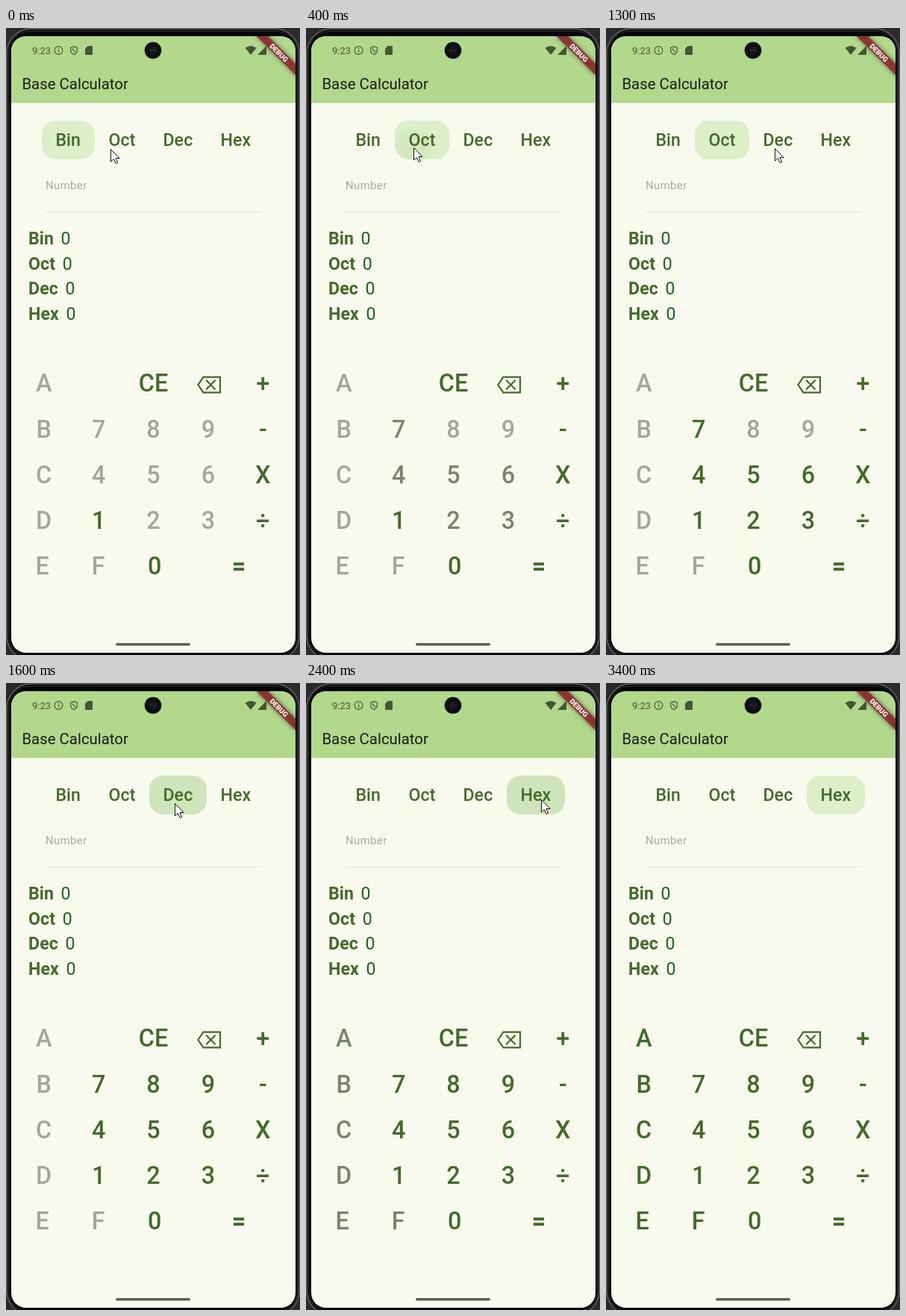
These frames come from a looping animation (394 px wide and 840 px high, 3500 ms). An HTML page:

```html
<!DOCTYPE html>
<html lang="en">
<head>
<meta charset="utf-8">
<title>Base Calculator</title>
<style>
  html, body { margin: 0; width: 100%; height: 100%; overflow: hidden; background: #111; }
  svg { display: block; width: 394px; height: 840px; font-family: Roboto, "Noto Sans", sans-serif; }
  .tab { font-size: 23.15px; font-weight: 500; fill: #446a2b; letter-spacing: .1px; }
  .base { font-size: 23.15px; font-weight: 700; fill: #446a2b; }
  .value { font-size: 23.15px; fill: #1f6124; }
  .key { font-size: 32.4px; font-weight: 500; text-anchor: middle; }
  .heavy { font-weight: 700; }
</style>
</head>
<body>
<svg viewBox="0 0 394 840">
  <defs>
    <clipPath id="screen"><rect x="7" y="11" width="381" height="826" rx="20"/></clipPath>
    <clipPath id="pillClip"><rect id="inkArea" y="124" height="52" rx="18.5"/></clipPath>
    <filter id="blur" x="-20%" y="-80%" width="140%" height="260%"><feGaussianBlur stdDeviation="3.4"/></filter>
    <radialGradient id="ink"><stop offset=".5" stop-color="#33691e"/><stop offset="1" stop-color="#33691e" stop-opacity="0"/></radialGradient>
  </defs>

  <!-- phone body -->
  <rect width="394" height="840" fill="#2a2a2b"/>
  <rect x="1" y="1" width="392" height="846" rx="33" fill="#0e0e0f" stroke="#656567" stroke-width="1.4"/>
  <rect x="3.5" y="4.5" width="387" height="838" rx="28" fill="#050505" stroke="#2e2e30"/>

  <g clip-path="url(#screen)">
    <rect x="7" y="11" width="381" height="826" fill="#f9faee"/>
    <rect x="7" y="11" width="381" height="89.5" fill="#b1d88b"/>

    <!-- status bar -->
    <g fill="#465638">
      <text x="35" y="34.5" font-size="13">9:23</text>
      <circle cx="70.5" cy="30" r="5.4" fill="none" stroke="#465638" stroke-width="1.2"/>
      <path d="M69.9 29.2h1.3v3.6h-1.3zM69.9 26.9h1.3v1.3h-1.3z"/>
      <path d="M91 24.6l4.4 1.7v3.4c0 2.8-1.8 4.9-4.4 5.9c-2.6-1-4.4-3.1-4.4-5.9v-3.4zM88.7 27.5l4.5 5.2" fill="none" stroke="#465638" stroke-width="1.2"/>
      <path d="M109.7 24h5.3q1 0 1 1v10q0 1-1 1h-8q-1 0-1-1v-7.3z"/>
      <path d="M328 36l-7.5-9.3q7.5-5.4 15 0zM349 24v12h-12z"/>
    </g>
    <circle cx="197" cy="30" r="11.3" fill="#0d0e10"/>
    <circle cx="197" cy="30" r="5.5" fill="#17181b"/>
    <path d="M193 30h2M196.5 30h1.5M200 30h1.5" stroke="#45464a"/>
    <text x="21.4" y="81.5" font-size="20.4" fill="#1a1c16">Base Calculator</text>

    <!-- corner banner -->
    <g transform="translate(388 11) rotate(45)">
      <rect x="-37" y="25.9" width="74" height="11.1" opacity=".5" filter="url(#blur)"/>
      <rect x="-37" y="25.9" width="74" height="11.1" fill="#981c27" fill-opacity=".75"/>
      <text y="34.8" font-size="9.45" font-weight="900" fill="#fff" text-anchor="middle">DEBUG</text>
    </g>

    <!-- base selector -->
    <rect id="pill" y="124" height="52" rx="18.5" fill="#dcefc8"/>
    <g clip-path="url(#pillClip)"><circle id="ripple" fill="url(#ink)"/></g>
    <g id="tabs"></g>

    <text x="53" y="216" font-size="14.8" letter-spacing=".46" fill="#a8aaa0">Number</text>
    <path d="M53 246.5h288" stroke="#e2e4d8"/>
    <g id="results"></g>
    <g id="keys"></g>
    <path d="M257.4 478L264.4 467.6H287V488.4H264.4ZM268.2 471.8L280.6 484.2M280.6 471.8L268.2 484.2" fill="none" stroke="#446a2b" stroke-width="2.2"/>
    <rect x="147" y="824" width="100" height="3.5" rx="1.75" fill="#5f6159"/>
  </g>
  <path id="cursor" d="M0 0V16.5L3.9 13L6.6 19L9.1 17.9L6.5 12H11.6Z" fill="#fff" stroke="#111"/>
</svg>
<script>
  const LOOP = 3500, STEP = 100;
  const OFF = '#a4a69b', MID = '#7a8470', ON = '#446a2b';
  const $ = id => document.getElementById(id);

  function addText(parent, text, x, y, cls) {
    const el = document.createElementNS('http://www.w3.org/2000/svg', 'text');
    setAttrs(el, { x, y, class: cls });
    el.textContent = text;
    $(parent).append(el);
    return el;
  }

  function setAttrs(el, attrs) {
    for (const name in attrs) el.setAttribute(name, attrs[name]);
  }

  // since: moment of selection; ink: ripple opacity from the press onwards
  const tabs = [
    { name: 'Bin', x: 48, w: 71, valueX: 73.6, since: 0, ink: [[0, 0]] },
    { name: 'Oct', x: 119, w: 73, valueX: 75.8, since: 400, ink: [[300, .04], [400, .05], [500, .07], [900, .03], [1100, 0]] },
    { name: 'Dec', x: 192, w: 77, valueX: 79.6, since: 1500, ink: [[1400, .04], [1500, .08], [1600, .077], [2000, 0]] },
    { name: 'Hex', x: 269, w: 78, valueX: 80.6, since: 2400, ink: [[2200, .04], [2400, .08], [2500, .075], [2900, 0]] }
  ];
  tabs.forEach((tab, i) => {
    const y = 290.4 + i * 33.4;
    addText('tabs', tab.name, tab.x + 18.4, 158, 'tab');
    addText('results', tab.name, 30.1, y, 'base');
    addText('results', '0', tab.valueX, y, 'value');
  });

  // a key becomes usable when a base that contains it is selected
  const enabledAt = label =>
    /^[2-7]$/.test(label) ? 400 : /^[89]$/.test(label) ? 1500 : /^[A-F]$/.test(label) ? 2400 : 0;

  const rows = ['A,,CE,,+', 'B,7,8,9,-', 'C,4,5,6,X', 'D,1,2,3,÷', 'E,F,0,,='];
  const lastRowX = [48.6, 123.7, 199.2, 0, 312];
  const keys = [];
  rows.forEach((row, r) => row.split(',').forEach((label, c) => {
    if (!label) return;
    const x = r === 4 ? lastRowX[c] : 197.5 + (c - 2) * 73.4;
    const cls = label === '=' ? 'key heavy' : 'key';
    keys.push({ el: addText('keys', label, x, 487.4 + r * 61.2, cls), at: enabledAt(label) });
  }));

  const path = [
    [0, 140, 162], [300, 144, 160], [700, 144, 160], [900, 165, 160], [1300, 226, 161],
    [1600, 226, 161], [1900, 309, 155], [2000, 313, 154], [2200, 315, 156],
    [2600, 315, 156], [2800, 326, 200], [3000, 306, 420], [3100, 302, 575]
  ];

  // linear interpolation of column k in a list of [time, ...values]
  function sample(track, t, k = 1) {
    const next = track.findIndex(p => p[0] > t);
    if (next < 0) return track[track.length - 1][k];
    if (next === 0) return track[0][k];
    const a = track[next - 1], b = track[next];
    return a[k] + (b[k] - a[k]) * (t - a[0]) / (b[0] - a[0]);
  }

  function draw(t) {
    const active = tabs.filter(tab => t >= tab.since).pop();
    setAttrs($('pill'), { x: active.x, width: active.w });

    const pressed = tabs.filter(tab => t >= tab.ink[0][0]).pop();
    const start = pressed.ink[0][0];
    setAttrs($('inkArea'), { x: pressed.x, width: pressed.w });
    setAttrs($('ripple'), {
      cx: sample(path, start, 1),
      cy: sample(path, start, 2),
      r: Math.min(200, .003 * (t - start) ** 2),
      opacity: sample(pressed.ink, t)
    });

    for (const { el, at } of keys)
      el.style.fill = t < at ? OFF : at && t === at ? MID : ON;

    setAttrs($('cursor'), {
      transform: `translate(${sample(path, t, 1) + .5} ${sample(path, t, 2) + .5})`,
      visibility: t < 3200 ? 'visible' : 'hidden'
    });
  }

  function tick() {
    draw(Math.floor(performance.now() % LOOP / STEP) * STEP);
    requestAnimationFrame(tick);
  }
  tick();
</script>
</body>
</html>
```
